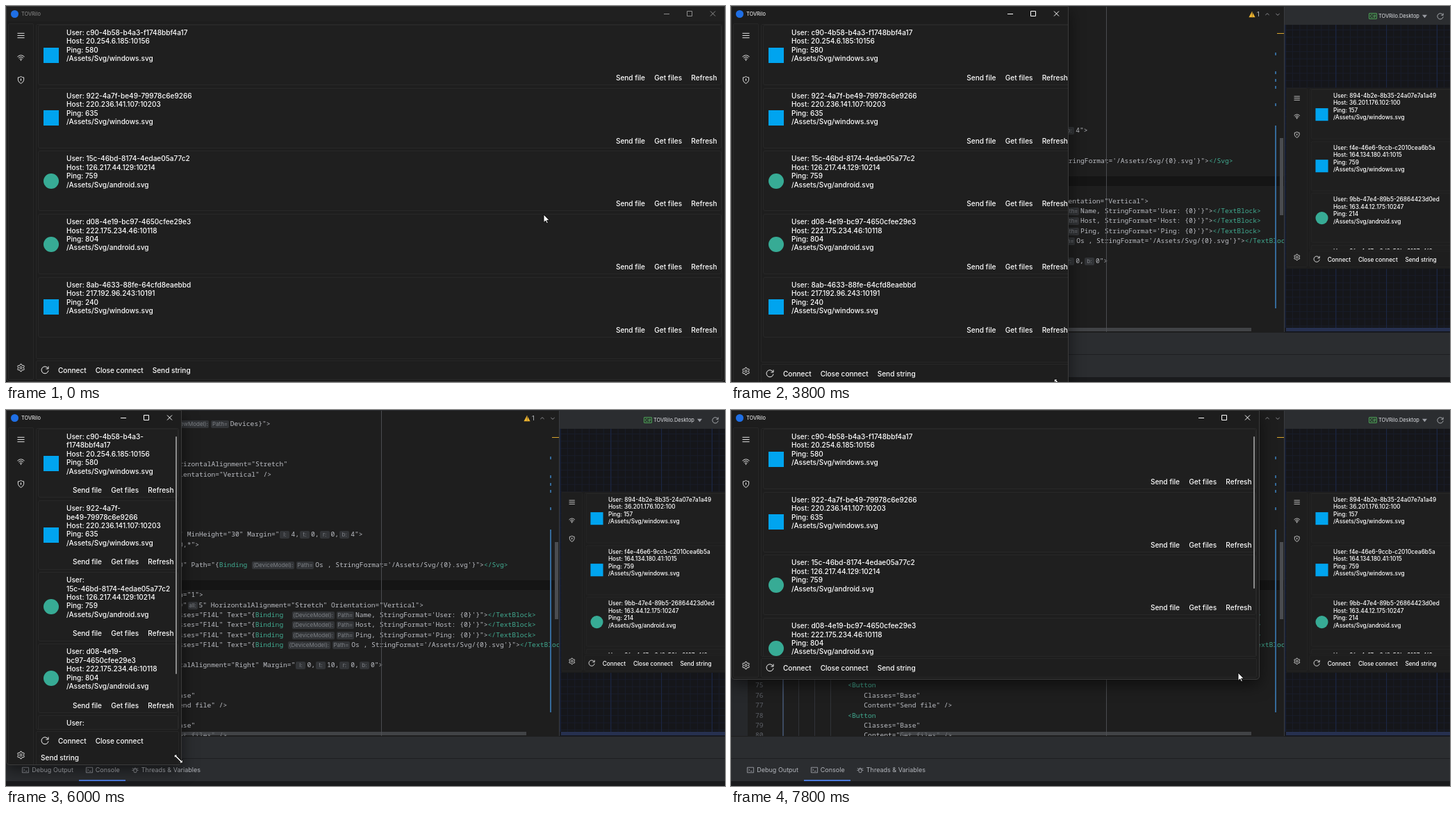
Write an HTML page that moves like this. It is 1035x541 px and loops after 8000 ms.

```html
<!DOCTYPE html>
<html lang="en">
<head>
<meta charset="utf-8">
<title>TOVRilo</title>
<style>
html, body { margin: 0; width: 100%; height: 100%; overflow: hidden; background: #1e1e1e; }
* { box-sizing: border-box; }
#stage { position: relative; width: 1035px; height: 541px; overflow: hidden; background: #1e1e1e;
  font: 10.05px/12.4px Inter, sans-serif; color: #fff; }
#stage svg { display: block; fill: none; stroke: currentColor; stroke-width: 1.9; overflow: visible; }
.box, .at, .code { position: absolute; white-space: pre; }
.at { transform: translateY(-50%); }

/* editor */
#editor { position: absolute; width: 797px; height: 469px; overflow: hidden; }
.code { font: 9.65px/14.45px "Noto Sans Mono", "DejaVu Sans Mono", monospace; color: #bcbec4; }
.code b { font-weight: 400; color: #41ab91; }
.code u { display: inline-block; min-width: 14px; height: 11px; margin: 0 2px 0 1px; padding: 0 1.6px;
  font: 8px/11px Inter, sans-serif; text-align: center; text-decoration: none; color: #7d8086;
  background: #323437; border-radius: 2px; }
.num { left: 35px; color: #5c5f66; }
#preview { position: absolute; left: 797px; top: 27px; width: 238px; height: 436px; overflow: hidden;
  background:
    linear-gradient(90deg, #1b2748 1px, transparent 1px) .5px 0 / 72.8px 100%,
    linear-gradient(90deg, #181c29 1px, transparent 1px) .5px 0 / 10.4px 100%,
    linear-gradient(#181c29 1px, transparent 1px) 0 7px / 100% 10.4px, #15161a; }
#preview .app { transform: translate(0, 70.7px) scale(.823); transform-origin: 0 0;
  clip-path: inset(24px 0 0 3px); }
#preview .card { padding-left: 38px; }

/* application */
.app { position: absolute; left: 0; top: 0; background: #1d1d1d; font-weight: 500; }
.side, .list, .foot { border: 1px solid #272727; border-radius: 2px; background: #1e1e1e; }
.side { position: absolute; left: 3px; top: 25px; bottom: 3px; width: 37px; }
.side svg { position: absolute; left: 12px; }
.main { position: absolute; left: 43px; right: 4px; top: 26px; bottom: 3px;
  display: flex; flex-direction: column; gap: 2px; }
.list { flex: 1; min-height: 0; overflow: hidden; }
.card { position: relative; margin: 0 0 3.7px 2px; padding: 4px 5.5px 3.8px 40px;
  border: 1px solid #282828; border-radius: 3px; background: #1f1f1f; }
.card .text { margin-right: -4px; }
.card .text i { font-style: normal; white-space: nowrap; }
.card .mark { position: absolute; left: 7px; top: calc(50% - 11px); width: 22px; height: 22px; background: #00a4ef; }
.card .round { border-radius: 50%; background: #37ab95; }
.card .acts { display: flex; justify-content: flex-end; gap: 13.3px; margin-top: 15.2px; white-space: nowrap; }
.foot { display: flex; flex-wrap: wrap; column-gap: 13px; padding: 1px 5px 1px 6px; line-height: 24px; white-space: nowrap; }
.foot svg { margin-top: 6px; }
.thumb { position: absolute; top: 38px; width: 2px; border-radius: 1px; background: #8c8c8c; }

/* window */
#win { position: absolute; left: 0; top: 0; border-radius: 0 0 5px 5px; box-shadow: 0 7px 22px rgba(0, 0, 0, .55); }
#clip { position: absolute; inset: 0; overflow: hidden; border-radius: inherit; }
#win::after { content: ""; position: absolute; inset: 0; border: 1px solid #3b3b3b; border-radius: inherit; }
#bar { position: absolute; left: 0; right: 0; top: 0; height: 22px; background: #1d1d1d; }
#bar.idle { color: #8d8d8d; background: #202020; }
#bar .logo { left: 7px; top: 6px; width: 11px; height: 11px; border-radius: 50%; background: #1f6fe5; }
#bar svg { position: absolute; right: 13px; top: 7px; }
#cursor svg { position: absolute; left: 0; top: 0; fill: #fff; stroke: #000; stroke-width: .9; }
</style>
</head>
<body>
<div id="stage">
  <div id="editor"></div>
  <div id="preview"></div>
  <div id="chrome"></div>
  <div id="win"><div id="clip"><div id="bar"></div></div></div>
  <div id="cursor"></div>
</div>
<script>
const $ = id => document.getElementById(id);
const svg = (d, size = 11, style = '') =>
  `<svg width="${size}" height="${size}" viewBox="0 0 24 24" style="${style}"><path d="${d}"/></svg>`;
const box = (x, y, w, h, color) =>
  `<div class="box" style="left:${x}px;top:${y}px;width:${w}px;height:${h}px;background:${color}"></div>`;
const place = (x, y, html, color = '#c4c7cc', size = 9) =>
  `<div class="at" style="left:${x}px;top:${y}px;color:${color};font-size:${size}px">${html}</div>`;

// toothed wheel: pairs of outer and inner points around a hub
function wheel(teeth) {
  let d = 'M';
  for (let i = 0; i < teeth * 4; i++) {
    const r = i % 4 < 2 ? 11.5 : 8.5, a = (i - .5) * Math.PI / teeth / 2;
    d += `${(12 + r * Math.sin(a)).toFixed(1)} ${(12 - r * Math.cos(a)).toFixed(1)} `;
  }
  return d + 'ZM15.5 12a3.5 3.5 0 1 1-7 0a3.5 3.5 0 1 1 7 0';
}

const icons = {
  menu: 'M1 5H23M1 12H23M1 19H23',
  wifi: 'M1 9Q12 -1 23 9M4.5 13Q12 6 19.5 13M8 16.5Q12 13 16 16.5M11 19h2v1h-2z',
  shield: 'M12 1Q16 4 21 4V12Q20 19 12 23Q4 19 3 12V4Q8 4 12 1ZM12 8v7M10.5 9.5h3',
  gear: wheel(6),
  reload: 'M21 7A10 10 0 1 0 22 13M22 1V8H15',
  term: 'M1 3H23V21H1ZM5 8l4 4-4 4M12 16h6',
  bug: 'M7 9h10v7a5 5 0 0 1-10 0zM8 9a4 4 0 0 1 8 0M1 13h6M17 13h6M2 5l5 5M22 5l-5 5'
};

// --- application -----------------------------------------------------------
const devices = [
  ['c90-4b58-b4a3-f1748bbf4a17', '20.254.6.185:10156', 580, 'windows'],
  ['922-4a7f-be49-79978c6e9266', '220.236.141.107:10203', 635, 'windows'],
  ['15c-46bd-8174-4edae05a77c2', '126.217.44.129:10214', 759, 'android'],
  ['d08-4e19-bc97-4650cfee29e3', '222.175.234.46:10118', 804, 'android'],
  ['8ab-4633-88fe-64cfd8eaebbd', '217.192.96.243:10191', 240, 'windows']
];
const samples = [
  ['894-4b2e-8b35-24a07e7a1a49', '36.201.176.102:100', 157, 'windows'],
  ['f4e-46e6-9ccb-c2010cea6b5a', '164.134.180.41:1015', 759, 'windows'],
  ['9bb-47e4-89b5-26864423d0ed', '163.44.12.175:10247', 214, 'android'],
  ['2fa-4c17-a3d8-50be9127c4f6', '81.120.33.90:10122', 318, 'windows']
];

// ids may only wrap after a hyphen that precedes a letter
const wrapId = id => id.split(/(?<=-)(?=[a-z])/).map(s => `<i>${s}</i>`).join('<wbr>');
const spans = (...words) => words.map(s => `<span>${s}</span>`).join('');

const card = ([id, host, ping, os]) => `<div class="card">
  <div class="mark${os === 'android' ? ' round' : ''}"></div>
  <div class="text">User: ${wrapId(id)}<br>Host: ${host}<br>Ping: ${ping}<br>/Assets/Svg/${os}.svg</div>
  <div class="acts">${spans('Send file', 'Get files', 'Refresh')}</div></div>`;

function makeApp(items) {
  const app = document.createElement('div');
  app.className = 'app';
  app.innerHTML = `<div class="side">
    ${['menu', 'wifi', 'shield'].map((name, i) => svg(icons[name], 11, `top:${11 + 32 * i}px`)).join('')}
    ${svg(icons.gear, 11, 'bottom:11px')}</div>
    <div class="main"><div class="list">${items.map(card).join('')}</div>
    <div class="foot">${svg(icons.reload, 12)}${spans('Connect', 'Close connect', 'Send string')}</div></div>
    <div class="thumb"></div>`;
  const list = app.querySelector('.list'), thumb = app.querySelector('.thumb');
  app.resize = (w, h) => {
    app.style.width = w + 'px';
    app.style.height = h + 'px';
    const view = list.clientHeight, full = list.scrollHeight;
    thumb.style.left = w - 9 + 'px';
    thumb.style.height = (full > view + 1 ? (view - 23) * view / full : 0) + 'px';
  };
  return app;
}

// --- editor ----------------------------------------------------------------
const lineTop = n => 345.8 + 14.45 * (n - 72);
const indent = depth => 75.5 + 23.17 * depth;
const paint = s => s.replace(/</g, '&lt;').replace(/&lt;\/?\w+>?/g, '<b>$&</b>')
  .replace('Binding', '<b>Binding</b>').replace(/\[(.+?)\]/g, '<u>$1</u>');
const code = (n, depth, text) =>
  `<div class="code" style="left:${indent(depth)}px;top:${lineTop(n)}px">${paint(text)}</div>`;
const bound = (name, format) => `[(DeviceModel):][Path=]${name}, StringFormat='${format}'}">`;
const field = (n, name) =>
  code(n, 4, `<TextBlock Classes="F14L" Text="{Binding  ${bound(name, name.replace('Name', 'User') + ': {0}')}</TextBlock>`);
const button = (n, text) =>
  code(n, 4, '<Button') + code(n + 1, 5, 'Classes="Base"') + code(n + 2, 5, `Content="${text}" />`);
const asset = bound('Os ', '/Assets/Svg/{0}.svg');

let html = box(0, 0, 24, 469, '#26282b') + box(24, 244.5, 773, 14.5, '#151515') + box(73.5, 0, 2.5, 469, '#3d4a60');
for (let depth = 1; depth < 4; depth++) html += box(indent(depth) - 2, 0, 1, 469, '#313338');
for (let n = 49; n <= 80; n++) html += `<div class="code num" style="top:${lineTop(n)}px">${n}</div>`;
html += code(49, 1, 'ItemsSource="{Binding[(MainViewModel):][Path=]Devices}">') +
  code(53, 7, 'HorizontalAlignment="Stretch"') + code(54, 7, 'Orientation="Vertical" />') +
  code(60, 5, '<Grid X="0" MinHeight="30" Margin="[l:]4,[t:]0,[r:]0,[b:]4">') + code(61, 5, 'Columns="50,*">') +
  code(63, 5, `<Svg W="130" Path="{Binding ${asset}</Svg>`) + code(66, 5, 'Grid.Column="1">') +
  code(67, 3, '<StackPanel Margin="[all:]5" HorizontalAlignment="Stretch" Orientation="Vertical">') +
  ['Name', 'Host', 'Ping'].map((name, i) => field(68 + i, name)).join('') +
  code(71, 4, `<TextBlock Classes="F14L" Text="{Binding ${asset}</TextBlock>`) + code(72, 3, '</WrapPanel>') +
  code(73, 3, '<WrapPanel HorizontalAlignment="Right" Margin="[l:]0,[t:]10,[r:]0,[b:]0">') +
  button(75, 'Send file') + button(78, 'Get files') +
  box(539.5, 0, 1, 469, '#4a4c50') + box(243, 463, 506, 5, '#505256b8') + box(790, 190, 5, 111, '#4a4c50');
for (const y of [67, 94, 105, 115, 140]) html += box(783, y, 1.5, 4, '#356a9a');
html += box(783, 172, 1.5, 263, '#356a9a') + box(786, 38.5, 10, 1.5, '#d9a52e') +
  place(745, 12, svg('M12 2L23 22H1Z', 10, 'fill:#f0b52f;stroke:none')) + place(749.2, 12.8, '!', '#222', 7) +
  place(757, 12, '1') + place(768, 12, svg('M4 15l8-7 8 7', 8)) + place(783, 12, svg('M4 9l8 7 8-7', 8));
$('editor').innerHTML = html;

const tab = (x, icon, text) => place(x, 518, svg(icons[icon], 10), '#a9acb2') + place(x + 14.3, 518, text, '#b4b7bd');
$('chrome').innerHTML = box(796, 0, 1, 469, '#393b40') + box(797, 0, 238, 27, '#2b2d30') + box(0, 0, 797, 1, '#2b2d30') +
  box(918, 10, 12, 9, '#25382a;border:1px solid #4f9d58;border-radius:1px') + place(920, 14.5, 'C#', '#6cc077', 6) +
  place(932, 15, 'TOVRilo.Desktop', '#dfe1e5', 7.4) +
  place(995, 15, svg('M0 4H24L12 20Z', 7, 'fill:currentColor;stroke:none'), '#9a9da3') +
  place(1016, 14.5, svg(icons.reload, 10)) +
  box(797, 463, 238, 6.500, '#17191f') + box(799, 463, 236, 5, '#26304f') +
  box(0, 469.5, 1035, 72, '#2b2d30') + box(0, 501, 1035, 1, '#1e1f22') +
  tab(23, 'term', 'Debug Output') + tab(114.5, 'term', 'Console') + tab(180.5, 'bug', 'Threads &amp; Variables') +
  box(105, 532, 67, 2, '#4a78d8') + box(0, 534, 1035, 7, '#1a1b1d');

const demo = makeApp(samples);
$('preview').append(demo);
demo.resize(585, 341);

// --- window ----------------------------------------------------------------
const app = makeApp(devices);
$('clip').prepend(app);
$('bar').innerHTML = '<div class="box logo"></div>' + place(22, 11.5, 'TOVRilo', 'inherit', 7.4) +
  '<svg width="75" height="8" viewBox="0 0 75 8" style="stroke-width:1"><path d="M0 4.5H8M33.5 .5h7v7h-7zM67 .5l7 7M74 .5l-7 7"/></svg>';

const arrow = 'M0 0V11.5L2.7 9 4.6 13 6.4 12.2 4.6 8.4H8.2Z';
const diagonal = 'M-6 -6h5l-1.7 1.7 7 7L6 1v5h-5l1.7-1.7-7-7L-6 -1z';

// dragged corner: time, width, height
const drag = [
  [2600, 1035, 541], [3000, 867, 533], [3800, 486, 546], [4600, 330, 543], [5000, 275, 541], [5400, 253, 541],
  [5800, 253, 541], [6000, 253, 511], [6750, 345, 350], [6800, 389, 347], [7000, 564, 362], [7400, 742, 412], [7600, 761, 388]
];

// slope at a key, flat at ends and turning points
function slope(i, k) {
  const a = drag[i - 1], b = drag[i], c = drag[i + 1];
  return a && c && (b[k] - a[k]) * (c[k] - b[k]) > 0 ? (c[k] - a[k]) / (c[0] - a[0]) : 0;
}

function corner(t) {
  const j = drag.findIndex(p => p[0] > t);
  if (j <= 0) return drag.at(j).slice(1);
  const a = drag[j - 1], b = drag[j], span = b[0] - a[0], u = (t - a[0]) / span;
  return [1, 2].map(k => a[k] + (b[k] - a[k]) * u * u * (3 - 2 * u) +
    span * u * (1 - u) * (slope(j - 1, k) * (1 - u) - slope(j, k) * u));
}

function pointer(t) {
  if (t < 2400) return [arrow, 774 + .368 * t, 300 + .362 * t];
  if (t >= 7800) return [arrow, 730, 378];
  const [x, y] = corner(t + LAG);
  return [diagonal, x - 5, y - 3];
}

const FRAME = 200, LAG = 30;
let shown;
function draw(time) {
  const t = Math.floor(time / FRAME) * FRAME;
  if (t === shown) return;
  shown = t;
  const [w, h] = corner(t), [shape, x, y] = pointer(t);
  $('win').style.width = w + 'px';
  $('win').style.height = h + 'px';
  $('bar').className = t < 2800 ? 'idle' : '';
  app.resize(...corner(t - LAG));   // contents trail behind the frame
  $('cursor').innerHTML = `<svg width="1035" height="541"><path transform="translate(${x} ${y})" d="${shape}"/></svg>`;
}

const start = performance.now();
function tick() {
  draw((performance.now() - start) % 8000);
  requestAnimationFrame(tick);
}
tick();
</script>
</body>
</html>
```
